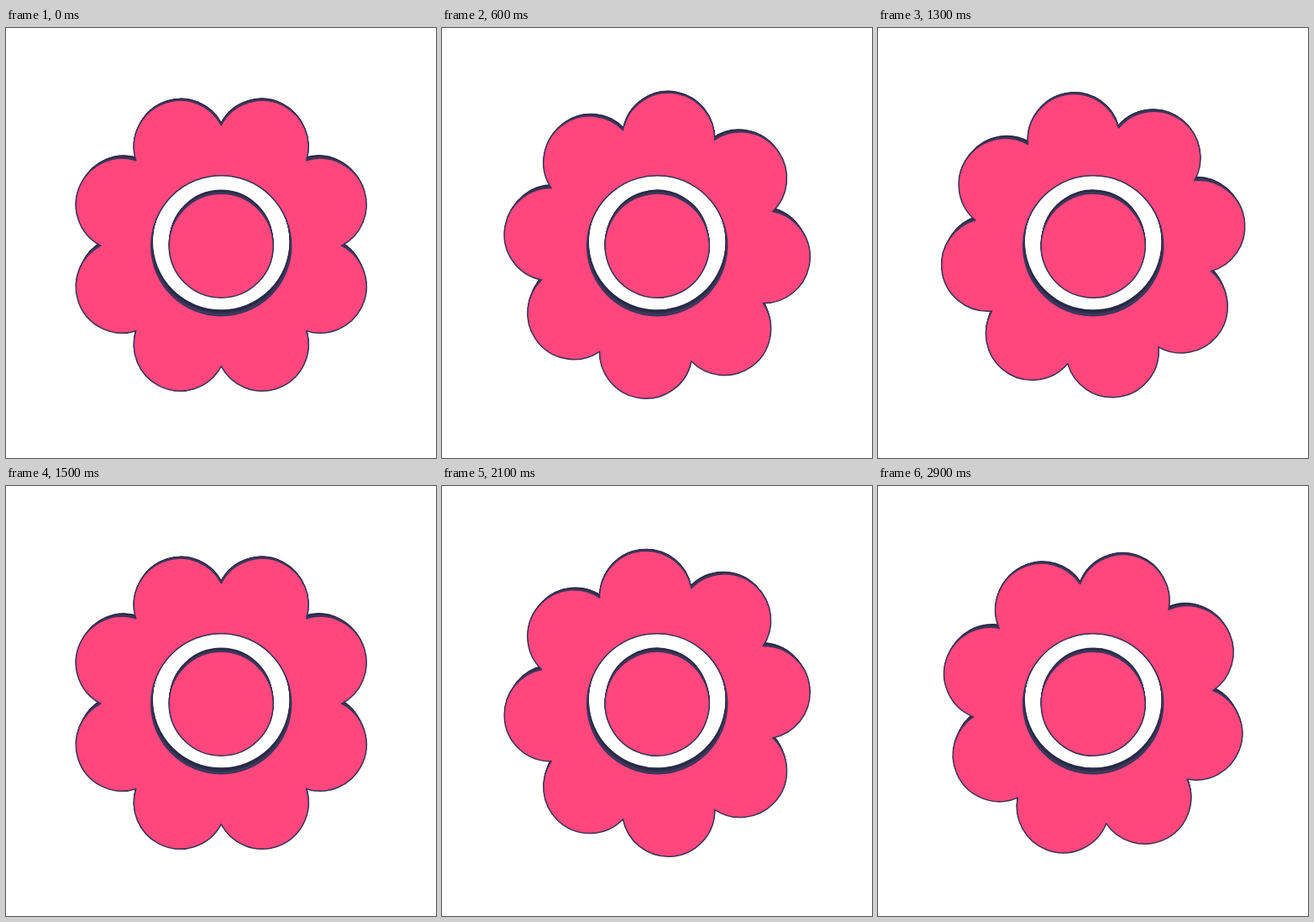
Animation, 512 px wide and 512 px high, one loop 3000 ms. Source, as an HTML page with a canvas:

```html
<!DOCTYPE html>
<html lang="en">
<head>
<meta charset="utf-8">
<title>Rocking flower</title>
<style>
  html, body { margin: 0; width: 100%; height: 100%; overflow: hidden; background: #fff; }
  canvas { display: block; width: 512px; height: 512px; }
</style>
</head>
<body>
<canvas id="stage" width="512" height="512"></canvas>
<script>
const ctx = document.getElementById('stage').getContext('2d');

const LOOP = 3000, STEP = 100, SWING = 30;
const CX = 256.2, CY = 259.2;
const PETALS = 8, PETAL_DIST = 127.5, PETAL_R = 55.2, NOTCH_R = 143.4;
const HOLE_R = 83.5, DISC_R = 62;
const BACK_SCALE = 0.982, BACK_LIFT = 5.1, LAYERS = 8;
const PINK = '#ff477e', LINE = '#3a3357';
const WALL_FRONT = [72, 66, 104], WALL_BACK = [40, 42, 70];

function circle(path, r) {
  path.moveTo(r, 0);
  path.arc(0, 0, r, 0, Math.PI * 2);
  path.closePath();
}

function makeFlower() {
  const path = new Path2D();
  const half = Math.PI / PETALS;
  // half the sweep of a petal arc, measured at the petal's own centre
  const sweep = Math.atan2(NOTCH_R * Math.sin(half), NOTCH_R * Math.cos(half) - PETAL_DIST);
  for (let i = 0; i < PETALS; i++) {
    const a = half * (2 * i + 1);
    path.arc(PETAL_DIST * Math.cos(a), PETAL_DIST * Math.sin(a), PETAL_R, a - sweep, a + sweep);
  }
  path.closePath();
  circle(path, HOLE_R);
  return path;
}

const flower = makeFlower();
const disc = new Path2D();
circle(disc, DISC_R);

function wallColor(depth) {
  const mix = WALL_FRONT.map((c, i) => Math.round(c + (WALL_BACK[i] - c) * Math.min(1, depth * 1.6)));
  return `rgb(${mix})`;
}

// depth 0 is the front face, 1 the back
function drawLayer(angle, depth, fill, line) {
  const s = 1 - (1 - BACK_SCALE) * depth;
  ctx.save();
  ctx.translate(CX, CY - BACK_LIFT * depth);
  ctx.scale(s, s);
  ctx.rotate(angle);
  ctx.fillStyle = fill;
  ctx.strokeStyle = line;
  ctx.lineWidth = 1.5;
  ctx.lineJoin = 'round';
  for (const shape of [flower, disc]) {
    ctx.fill(shape, 'evenodd');
    ctx.stroke(shape);
  }
  ctx.restore();
}

function draw(now) {
  const t = Math.floor((now % LOOP) / STEP) * STEP;
  const angle = SWING * Math.PI / 180 * Math.sin(2 * Math.PI * t / LOOP);
  ctx.fillStyle = '#fff';
  ctx.fillRect(0, 0, 512, 512);
  for (let i = LAYERS; i > 0; i--) {
    const color = wallColor(i / LAYERS);
    drawLayer(angle, i / LAYERS, color, color);
  }
  drawLayer(angle, 0, PINK, LINE);
}

let start;
function tick(now) {
  if (start === undefined) start = now;
  draw(Math.max(0, now - start));
  requestAnimationFrame(tick);
}
draw(0);
requestAnimationFrame(tick);
</script>
</body>
</html>
```
